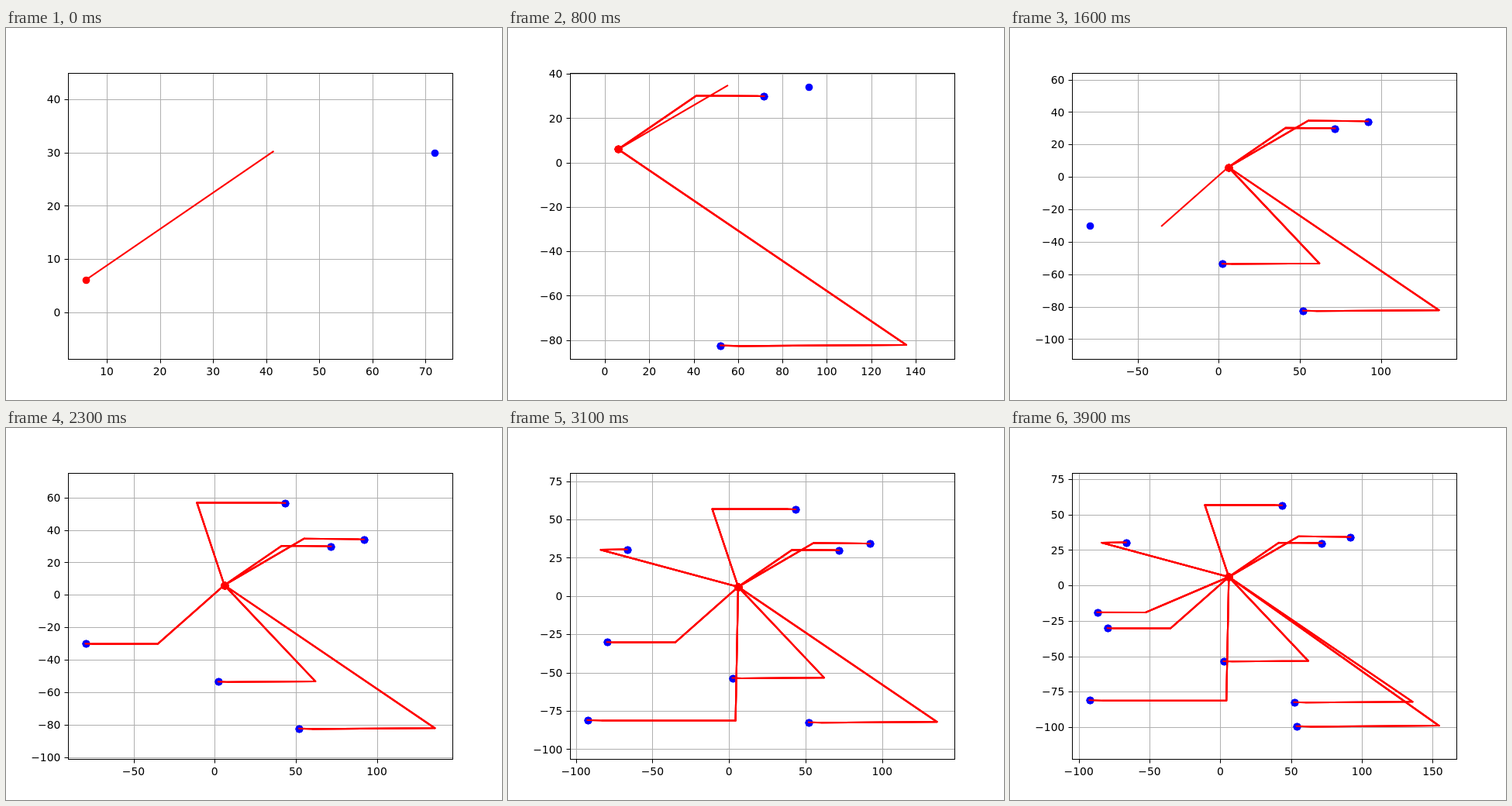
An HTML page with a canvas that plays this animation: 640x480 px, repeating every 4000 ms.

```html
<!DOCTYPE html>
<html lang="en">
<head>
<meta charset="utf-8">
<title>Convergence paths</title>
<style>
  html, body { margin: 0; width: 100%; height: 100%; overflow: hidden; background: #fff; }
  canvas { display: block; }
</style>
</head>
<body>
<canvas id="plot" width="640" height="480"></canvas>
<script>
const ctx = document.getElementById('plot').getContext('2d');
const STEP_MS = 100, STEPS = 4;
const BOX = { left: 80, right: 576, top: 57.6, bottom: 427.2 };
const WIDTH = BOX.right - BOX.left, HEIGHT = BOX.bottom - BOX.top;
const START = [6, 6];

// Goal x, y and first corner x, y of each run
const RUNS = [
  [71.75, 29.9, 41.3, 30.2],
  [52.1, -82.4, 135.8, -82.15],
  [92, 34.2, 55.2, 34.67],
  [2.3, -53.5, 62.1, -53.3],
  [-79.6, -30.1, -35, -30.2],
  [43.5, 56.6, -10.9, 56.8],
  [-66.6, 30.4, -83.7, 30.2],
  [-92.4, -81, 4.3, -81.3],
  [53.9, -99.4, 154.4, -99],
  [-86.9, -18.9, -52.8, -19.05]
];
const TOTAL = RUNS.length * STEPS;

// Each step leaves about a tenth of the remaining error
const paths = RUNS.map(([gx, gy, cx, cy]) => {
  const dx = cx - gx, dy = -0.0035 * dx;
  return [START, [cx, cy],
    [gx + 0.1 * dx, gy + dy],
    [gx + 0.01 * dx, gy + 0.1 * dy],
    [gx, gy]];
});

const snap = v => Math.floor(v + 0.5) + 0.5;

function getView(points) {
  const xs = points.map(p => p[0]), ys = points.map(p => p[1]);
  const x0 = Math.min(...xs), x1 = Math.max(...xs);
  const y0 = Math.min(...ys), y1 = Math.max(...ys);
  const k = Math.min(WIDTH / (x1 - x0), HEIGHT / (y1 - y0)) / 1.1;
  const mx = (x0 + x1) / 2, my = (y0 + y1) / 2;
  return {
    xMin: mx - WIDTH / k / 2, xMax: mx + WIDTH / k / 2,
    yMin: my - HEIGHT / k / 2, yMax: my + HEIGHT / k / 2,
    x: v => (BOX.left + BOX.right) / 2 + (v - mx) * k,
    y: v => (BOX.top + BOX.bottom) / 2 - (v - my) * k
  };
}

function getTicks(lo, hi) {
  const raw = (hi - lo) / 9, base = 10 ** Math.floor(Math.log10(raw));
  const step = base * [1, 2, 2.5, 5, 10].find(s => s * base >= raw);
  const ticks = [];
  for (let i = Math.ceil(lo / step); i * step <= hi; i++) ticks.push(i * step);
  return ticks;
}

const label = v => (v < 0 ? '\u2212' : '') + Math.abs(v);

function segment(x0, y0, x1, y1, color) {
  ctx.strokeStyle = color;
  ctx.beginPath();
  ctx.moveTo(x0, y0);
  ctx.lineTo(x1, y1);
  ctx.stroke();
}

function drawAxes(view) {
  const l = snap(BOX.left), r = snap(BOX.right), t = snap(BOX.top), b = snap(BOX.bottom);
  ctx.lineWidth = 1;
  ctx.lineCap = 'butt';
  ctx.fillStyle = '#000';
  ctx.font = '13.89px "DejaVu Sans", sans-serif';
  ctx.textAlign = 'center';
  for (const v of getTicks(view.xMin, view.xMax)) {
    const x = snap(view.x(v));
    segment(x, t, x, b, '#b0b0b0');
    segment(x, b, x, b + 5, '#000');
    ctx.fillText(label(v), view.x(v), 448);
  }
  ctx.textAlign = 'right';
  for (const v of getTicks(view.yMin, view.yMax)) {
    const y = snap(view.y(v));
    segment(l, y, r, y, '#b0b0b0');
    segment(l - 5, y, l, y, '#000');
    ctx.fillText(label(v), 70.3, Math.round(view.y(v) + 5.2));
  }
}

function drawDot(view, [x, y], color) {
  ctx.fillStyle = color;
  ctx.beginPath();
  ctx.arc(snap(view.x(x)), snap(view.y(y)), 4.86, 0, 2 * Math.PI);
  ctx.fill();
}

function drawPath(view, points) {
  ctx.strokeStyle = '#f00';
  ctx.lineWidth = 2.083;
  ctx.lineCap = 'square';
  ctx.lineJoin = 'round';
  ctx.beginPath();
  points.forEach(([x, y]) => ctx.lineTo(view.x(x), view.y(y)));
  ctx.stroke();
}

function draw(step) {
  const shown = [];
  for (let i = 0; i <= step; i++) {
    const path = paths[Math.floor(i / STEPS)];
    shown.push({ goal: path[STEPS], points: path.slice(0, i % STEPS + 2) });
  }
  const view = getView(shown.flatMap(s => [s.goal, ...s.points]));

  ctx.fillStyle = '#fff';
  ctx.fillRect(0, 0, 640, 480);
  drawAxes(view);

  // Every step plots again over the earlier ones, which thickens the edges
  for (const { goal, points } of shown) {
    drawDot(view, START, '#f00');
    drawDot(view, goal, '#00f');
    drawPath(view, points);
  }

  ctx.lineWidth = 1;
  ctx.lineCap = 'butt';
  ctx.lineJoin = 'miter';
  ctx.strokeStyle = '#000';
  const l = snap(BOX.left), t = snap(BOX.top);
  ctx.strokeRect(l, t, snap(BOX.right) - l, snap(BOX.bottom) - t);
}

const begin = performance.now();
let last = -1;
function tick() {
  const step = Math.floor((performance.now() - begin) / STEP_MS) % TOTAL;
  if (step !== last) draw(last = step);
  requestAnimationFrame(tick);
}
tick();
</script>
</body>
</html>
```
